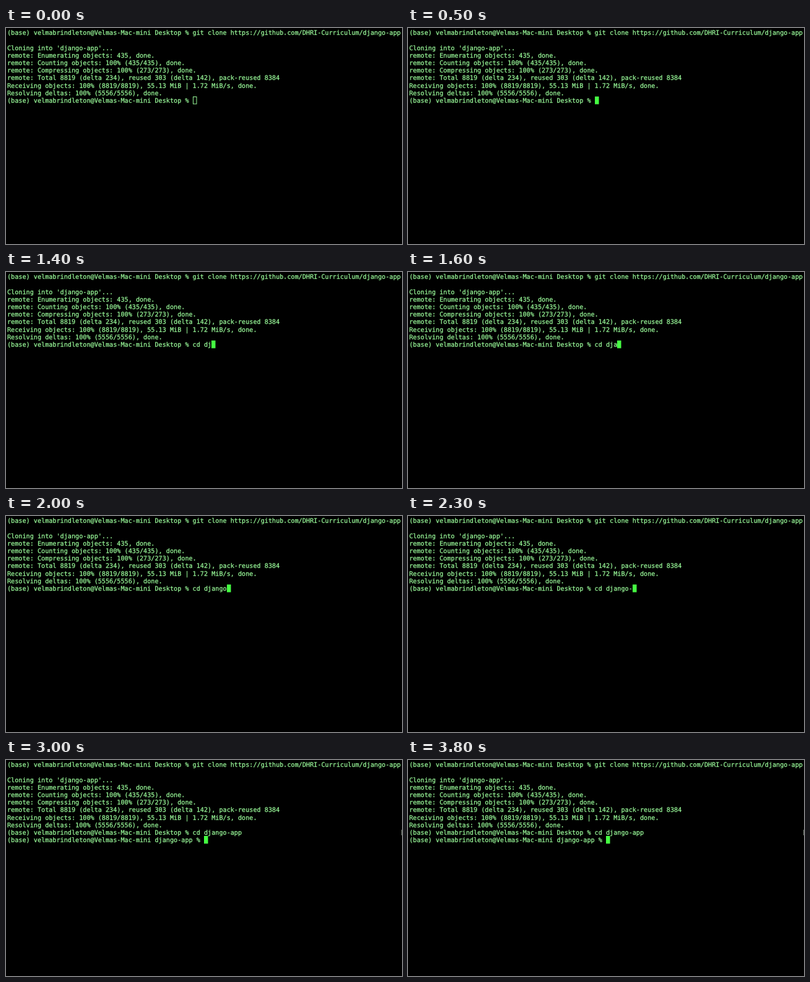
An HTML page with a canvas for the animation above (3900 ms loop, 640x350 px).

```html
<!DOCTYPE html>
<html lang="en">
<head>
<meta charset="utf-8">
<title>Terminal</title>
<style>
  html, body { margin: 0; width: 100%; height: 100%; overflow: hidden; background: #000; }
  canvas { display: block; }
</style>
</head>
<body>
<canvas id="stage" width="640" height="350"></canvas>
<script>
const ctx = document.getElementById('stage').getContext('2d');

const LOOP = 3900;
const FONT_SIZE = 10.17;
const LEFT = 2, TOP = 1, ROW = 12.2, BASELINE = 10.2;
const TEXT = '#98f898', CURSOR = '#45ff42', MARK = '#768276';

const prompt = dir => `(base) velmabrindleton@Velmas-Mac-mini ${dir} % `;
const output = [
  prompt('Desktop') + 'git clone https://github.com/DHRI-Curriculum/django-app',
  '',
  "Cloning into 'django-app'...",
  'remote: Enumerating objects: 435, done.',
  'remote: Counting objects: 100% (435/435), done.',
  'remote: Compressing objects: 100% (273/273), done.',
  'remote: Total 8819 (delta 234), reused 303 (delta 142), pack-reused 8384',
  'Receiving objects: 100% (8819/8819), 55.13 MiB | 1.72 MiB/s, done.',
  'Resolving deltas: 100% (5556/5556), done.'
];

const command = 'cd django-app';
const keyTimes = [800, 900, 1100, 1300, 1400, 1500, 1700, 1900, 2000, 2200, 2400, 2500, 2600];
const FOCUS = 300, ENTER = 2800;

ctx.font = `${FONT_SIZE}px "DejaVu Sans Mono", monospace`;
ctx.textRendering = 'geometricPrecision';
const cell = ctx.measureText('M').width;

const rowTop = row => Math.round(TOP + row * ROW);

function drawLine(text, row) {
  const y = Math.round(TOP + row * ROW + BASELINE);
  ctx.fillStyle = ctx.strokeStyle = TEXT;
  ctx.lineWidth = 0.25;
  ctx.fillText(text, LEFT, y);
  ctx.strokeText(text, LEFT, y); // slightly heavier glyphs
}

function drawCursor(col, row, filled) {
  const x = Math.round(LEFT + col * cell);
  const y = rowTop(row);
  if (filled) {
    ctx.fillStyle = CURSOR;
    ctx.fillRect(x, y, 6.5, 12.5);
  } else {
    ctx.strokeStyle = TEXT;
    ctx.lineWidth = 1;
    ctx.strokeRect(x + 0.5, y + 0.5, 5.5, 11.5);
  }
}

function draw(time) {
  ctx.fillStyle = '#000';
  ctx.fillRect(0, 0, 640, 350);

  const typed = command.slice(0, keyTimes.filter(t => t <= time).length);
  const lines = [...output, prompt('Desktop') + typed];
  if (time >= ENTER) {
    lines.push(prompt('django-app'));
    ctx.fillStyle = MARK;
    ctx.fillRect(639, rowTop(9) + 2, 1, 9);
  }

  lines.forEach(drawLine);
  const last = lines.length - 1;
  drawCursor(lines[last].length, last, time >= FOCUS);
}

function tick() {
  draw(performance.now() % LOOP);
  requestAnimationFrame(tick);
}
tick();
</script>
</body>
</html>
```
